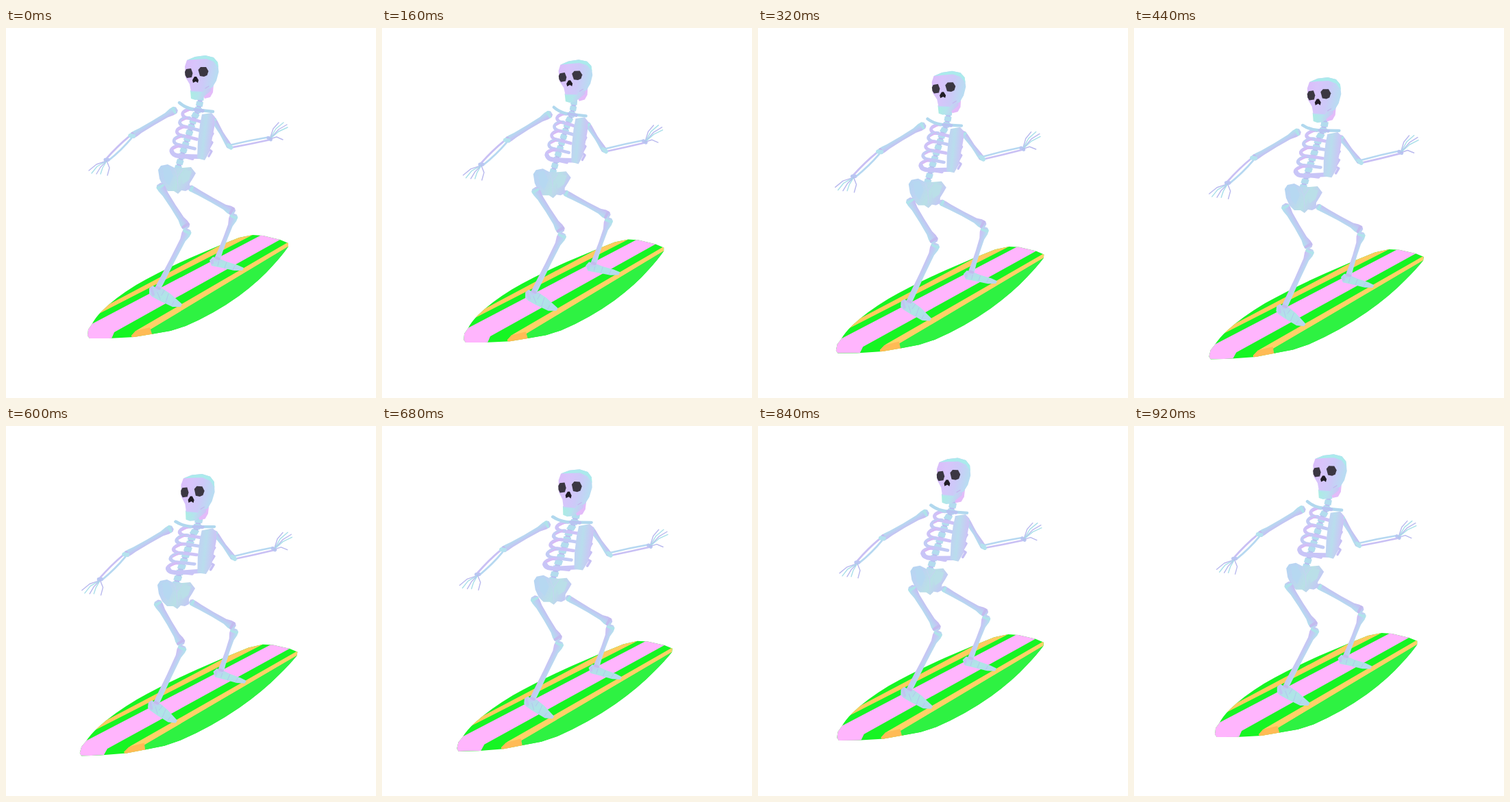
Recreate the animation shown at these times as an HTML page. Size 540 by 540 pixels, loop 0.96 s.

```html
<!DOCTYPE html>
<html lang="en">
<head>
<meta charset="utf-8">
<title>Surfing skeleton</title>
<style>
html, body { margin: 0; width: 100%; height: 100%; overflow: hidden; background: #fff; }
svg { display: block; width: 100vw; height: 100vh; }
</style>
</head>
<body>
<svg id="stage" viewBox="0 0 540 540" stroke-linejoin="round" stroke-linecap="round"></svg>
<script>
const LOOP = 960, STEP = 40;
const stage = document.getElementById('stage');

// joint: rest x, rest y, x bob, x sway, y bob, y sway
const rig = {
  tail: [119, 449, -10.6, 3.2, 31.5, -2.1],
  nose: [412, 315, 12, -4.3, 20, 1.8],
  rail: [187, 451, -10.4, 2.8, 29.8, -1.5],
  head: [285, 40, -7.6, -2.3, 33, -2.2],
  clavL: [253, 109, -6.7, -0.6, 34, -2.2],
  clavR: [302, 122, -1.6, -4.5, 28.6, -0.9],
  ribs: [240, 181, -5.9, 0.4, 31.4, -2.6],
  pelvis: [250, 221, -1.9, -0.9, 28.6, -0.9],
  shoulderL: [246, 120, -7.2, 0, 33, -2.7],
  elbowL: [184, 157, -9.5, 1.2, 33.7, -2.2],
  wristL: [147, 193, -10.7, 0.7, 34.8, -2.3],
  shoulderR: [303, 134, 0, -3, 26.7, 0.3],
  elbowR: [326, 173, 4.2, -2.9, 22.8, 0],
  wristR: [385, 161, 5, -2.9, 20.5, -0.8],
  hipL: [225, 231, -4.4, -0.2, 30.5, -2],
  kneeL: [263, 290, -8, 0.5, 30, -2],
  ankleL: [221, 381, -2, 0.6, 27.8, -1.3],
  toeL: [255, 405, -7, 1.5, 29.5, -1.9],
  hipR: [270, 234, 0, -2, 27.7, 0.2],
  kneeR: [331, 268, -0.4, -1.5, 27.4, -1.3],
  ankleR: [308, 338, 5.1, -1.3, 24.8, 1.4],
  toeR: [346, 352, 3.7, -0.7, 25.5, 0]
};
const rest = pose(0);

function pose(t) {
  const a = 2 * Math.PI * t / LOOP;
  const bob = (1 - Math.cos(a)) / 2, sway = Math.sin(a);
  const p = { bob, sway };
  for (const [name, [x, y, bx, sx, by, sy]] of Object.entries(rig))
    p[name] = [x + bx * bob + sx * sway, y + by * bob + sy * sway];
  for (const s of 'LR') p['shin' + s] = [p['knee' + s][0] + 1.5, p['knee' + s][1] + 7];
  return p;
}

function el(parent, tag, attrs = {}) {
  const e = document.createElementNS('http://www.w3.org/2000/svg', tag);
  for (const k in attrs) e.setAttribute(k, attrs[k]);
  parent.append(e);
  return e;
}
const group = (parent = stage) => el(parent, 'g');
const shape = (g, d, fill) => el(g, 'path', { d, fill });
const line = (g, d, stroke, width, extra) =>
  el(g, 'path', { d, stroke, 'stroke-width': width, fill: 'none', ...extra });

const defs = el(stage, 'defs');
function gradient(id, x2, y2, ...colors) {
  const g = el(defs, 'linearGradient', { id, x1: 0, y1: 0, x2, y2 });
  colors.forEach((c, i) => el(g, 'stop', { offset: i / (colors.length - 1), 'stop-color': c }));
  return `url(#${id})`;
}
const cool = gradient('cool', 0, 1, '#c9bbf3', '#bdcff2', '#b2e0ee');
const warm = gradient('warm', 0, 1, '#b4e2ee', '#bfcef3', '#cfbdf4');
const skin = gradient('skin', 1, 0.25, '#dabcfa', '#d8c4fb', '#cdc9f8', '#b9dcf2');
const hipFill = gradient('hipFill', 1, 0.4, '#b4d6f1', '#bdd3f3', '#b9e0e6', '#c4c8f5');
const plateFill = gradient('plateFill', 1, 0.3, '#c5cbf6', '#b9dded', '#cfc1f7');
const footFill = gradient('footFill', 1, 1, '#bfccf4', '#aee6e6', '#b8d4f1');
const jawFill = gradient('jawFill', 1, 0.2, '#a8efe0', '#b4e4ec', '#cdc4f7');

// transforms
const basis = (a, b, c) => new DOMMatrix([b[0] - a[0], b[1] - a[1], c[0] - a[0], c[1] - a[1], a[0], a[1]]);
const turn = (a, b) => [a[0] - (b[1] - a[1]), a[1] + (b[0] - a[0])];
const dist = (a, b) => Math.hypot(b[0] - a[0], b[1] - a[1]);
const movers = [];

function follow(g, a, b, c) {
  const at = p => basis(p[a], p[b], c ? p[c] : turn(p[a], p[b]));
  const inv = at(rest).inverse();
  movers.push(p => g.setAttribute('transform', at(p).multiply(inv)));
  return g;
}

function limb(e, a, b) {
  const size = dist(rest[a], rest[b]);
  movers.push(p => {
    const [x, y] = p[a], angle = Math.atan2(p[b][1] - y, p[b][0] - x) * 180 / Math.PI;
    e.setAttribute('transform',
      `translate(${x} ${y}) rotate(${angle}) scale(${dist(p[a], p[b]) / size} 1)`);
  });
  return e;
}

// tapered bone: near and far half widths, and the shaft's
function bone(a, b, near, mid, far, fill) {
  const n = dist(rest[a], rest[b]), g = limb(group(), a, b);
  const half = [[-4, near * 0.5], [-1, near], [5, near], [14, mid + 0.4], [n * 0.5, mid],
    [n - 14, mid + 0.4], [n - 6, far], [n, far], [n + 3, far * 0.5]];
  const pts = half.concat(half.map(([x, w]) => [x, -w]).reverse());
  shape(g, `M${pts.join('L')}Z`, fill);
  line(g, `M1 ${2 - near}V${near - 2}`, '#afe3ea', 4);
  line(g, `M${n - 2} ${2 - far}V${far - 2}`, '#c3bbee', 4);
}

function forearm(a, b, gap, width) {
  const g = limb(group(), a, b), n = dist(rest[a], rest[b]);
  line(g, `M3 -2Q${n / 2} ${-gap - 1} ${n - 1} -2`, '#b6d8f1', width);
  line(g, `M3 2Q${n / 2} ${gap + 0.5} ${n - 1} 2`, '#c9c0f4', width);
  line(g, 'M-1 -2L2 2', '#b5e2ee', 6);
  line(g, `M${n - 2} -1L${n + 1} 2`, '#bac6f2', 5);
}

function hand(a, b, tips) {
  const g = follow(group(), a, b), [x, y] = rest[b];
  tips.forEach(([mx, my, tx, ty], i) =>
    line(g, `M${x} ${y + 1}L${mx} ${my}L${tx} ${ty}`, i % 2 ? '#a9dfe9' : '#b9b9ee', 1.4));
}

function board() {
  const g = follow(group(), 'tail', 'nose', 'rail');
  const d = 'M119 449L120 440L125 433Q130 423 140 413Q159 394 190 375Q225 355 270 335L310 318L340 306' +
    'L360 302L375 303L400 309L412 314L412 319Q403 332 390 346Q371 368 340 391Q304 417 262 435' +
    'L240 442L217 446L187 451L150 453L122 453Z';
  shape(g, d, '#16f523');
  el(el(defs, 'clipPath', { id: 'deck' }), 'path', { d });
  const s = el(g, 'g', { 'clip-path': 'url(#deck)' });
  shape(s, 'M110 440L127 431L371 303L375 299L412 303L398 310L158 444L152 458L110 460Z', '#ffb5fd');
  shape(s, 'M124 423L360 302L341 302L147 405L124 417Z', '#ffcb5f');
  shape(s, 'M183 449L191 441L411 313L418 309L418 316L412 319L211 440L217 448L187 458Z', '#ffd168');
  shape(s, 'M183 449L189 442L210 437L211 440L217 448L187 458Z', '#ffbb55');
  shape(s, 'M211 440L412 319L418 316L418 460L217 460Z', '#2ef242');
}

function leg(s, near, mid, far) {
  bone('shin' + s, 'ankle' + s, far, mid - 0.4, 4.2, warm);
  bone('hip' + s, 'knee' + s, near, mid, far, cool);
}

function feet(s) {
  const g = follow(group(), 'ankle' + s, 'toe' + s);
  if (s === 'L') {
    shape(g, 'M209 380L214 376L219 379L228 380L240 388L257 403L255 407L243 407L224 398L213 392L209 388Z', footFill);
    line(g, 'M221 386L225 396M231 383L227 390M237 388L233 401M245 399L242 405', '#b4c6ee', 1);
    line(g, 'M212 380L215 389', '#c1c4f2', 4);
  } else {
    shape(g, 'M297 339L302 334L310 336L322 341L338 346L347 350L345 354L333 354L315 350L300 347Z', footFill);
    line(g, 'M311 339L309 347M322 342L319 350M334 347L331 353', '#b4c6ee', 1);
    line(g, 'M301 339L301 343', '#c1c4f2', 4);
  }
}

function chest() {
  const g = follow(group(), 'clavL', 'clavR', 'ribs');
  const spine = 'M284 98Q283 118 275 130Q266 158 258 182L250 208';
  line(g, spine, '#b9bef0', 7, { 'stroke-linecap': 'butt' });
  line(g, spine, '#b3dcee', 10, { 'stroke-dasharray': '7 2', 'stroke-linecap': 'butt' });
  for (let i = 0; i < 4; i++)
    line(g, `M${299 - i} ${138 + i * 13}l4 3l-4 7`, '#c6c0f4', 3.4);
  for (let i = 0; i < 5; i++) {
    const x = 258 - i * 4.2, y = 126 + i * 12 + i * i * 0.35;
    line(g, `M${x + 14} ${y - 7}C${x + 4} ${y - 9} ${x - 7} ${y} ${x + 5} ${y + 5}Q${x + 14} ${y + 7} ${x + 27 + i} ${y + 11}`,
      i % 2 ? '#c2cbf5' : '#cdc3f7', 4.8);
    line(g, `M${x + 3} ${y - 3}L${x + 11} ${y - 7}`, '#d9b9f5', 2);
  }
  line(g, 'M242 180Q243 186 253 187L288 188', '#c8c5f7', 6.5);
  shape(g, 'M286 126L300 124L305 130L304 145L300 166L297 181L290 193L279 190L280 165L283 141Z', plateFill);
  line(g, 'M253 109Q262 117 275 119L302 122', '#b1d8ee', 4.4);
  line(g, 'M276 119L287 121', '#b8c3f1', 5);
}

function hips() {
  const g = group();
  shape(g, 'M222 207L226 201L236 199L246 204L258 204L270 203L277 212L273 219L268 227L268 235L262 238' +
    'L256 237L251 242L245 238L236 238L229 231L224 220Z', hipFill);
  line(g, 'M246 206L250 217L258 206M250 217L251 235', '#c3d5f0', 1.2);
  shape(g, 'M229 204L238 202L244 216L238 230L231 222Z', '#b6d8f1');
  shape(g, 'M262 207L271 209L267 222L258 228L256 216Z', '#badfe8');
  movers.push(p => g.setAttribute('transform',
    `translate(${p.pelvis[0] - rest.pelvis[0]} ${p.pelvis[1] - rest.pelvis[1]})`));
}

function skull() {
  const g = group();
  shape(g, 'M291 80L303 82L302 94L298 101L290 103L286 95Z', '#e3bbf9');
  shape(g, 'M269 91L270 103L276 105L284 104L290 99L299 92L300 82L287 88Z', jawFill);
  shape(g, 'M261 56L264 47L276 42L291 40L303 43L309 50L310.5 64L307 77L301 87L291 89L286 94L270 93L268 82L262 72Z', skin);
  shape(g, 'M264 47L276 42L291 40L303 43L309 50L310 58L303 49L292 45L275 46Z', '#abeaec');
  line(g, 'M271 93L285 94', '#b5e2ef', 2);
  line(g, 'M291 88L296 85', '#c3b5ee', 1.2);
  shape(g, 'M261 64L263 60L270 59L272.5 66L271 72L264 73L261.5 69Z', '#3b3742');
  shape(g, 'M280.5 61L284 57L292 57L295.5 63L293.5 69L289 71L283 70Z', '#3b3742');
  shape(g, 'M275 71L278 71L281 76L280 80L277 78L273 80L272 76Z', '#211c25');
  movers.push(p => g.setAttribute('transform',
    `translate(${p.head}) rotate(${0.8 * p.bob - 2.2 * p.sway}) scale(1 ${1 + 0.035 * p.bob - 0.055 * p.sway}) translate(-285 -40)`));
}

board();
feet('R');
leg('R', 4.5, 3.6, 6);
bone('shoulderR', 'elbowR', 4, 3, 4, cool);
forearm('elbowR', 'wristR', 2, 2.6);
hand('elbowR', 'wristR', [[390, 147, 398, 138], [394, 147, 405, 138], [398, 148, 410, 141],
  [398, 151, 411, 145], [395, 159, 404, 163]]);
chest();
bone('shoulderL', 'elbowL', 5.5, 3.4, 4.6, cool);
forearm('elbowL', 'wristL', 3.4, 2.8);
hand('elbowL', 'wristL', [[132, 199, 121, 208], [133, 202, 125, 212], [138, 203, 132, 213],
  [141, 204, 138, 213], [151, 204, 148, 215]]);
hips();
feet('L');
leg('L', 6, 4.2, 6.4);
skull();

function draw(now) {
  const p = pose(Math.floor(now % LOOP / STEP) * STEP);
  movers.forEach(move => move(p));
}
const start = performance.now();
function tick() {
  draw(performance.now() - start);
  requestAnimationFrame(tick);
}
tick();
</script>
</body>
</html>
```
